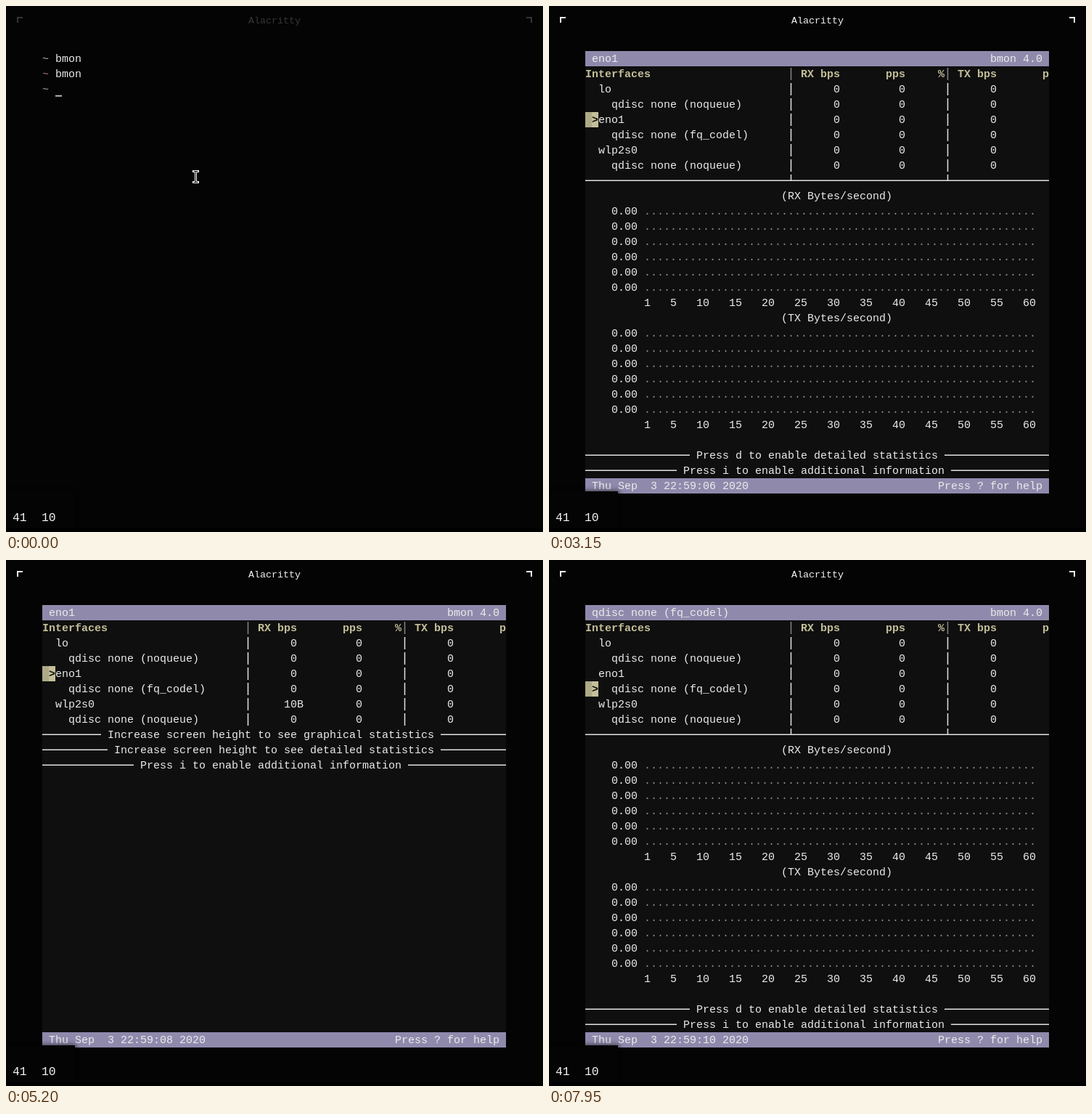
These frames come from a looping animation (740 by 724 pixels, 8000 ms). An HTML page:

```html
<!DOCTYPE html>
<html lang="en">
<head>
<meta charset="utf-8">
<title>Terminal</title>
<style>
html, body { margin: 0; width: 100%; height: 100%; overflow: hidden; background: #040404; }
svg { display: block; }
text { font: 15px "Liberation Mono", monospace; fill: #ebebeb; white-space: pre; }
.title { font-size: 13.33px; text-anchor: middle; }
.badge { font-size: 16.4px; fill: #f4f4f4; }
.head { font-weight: bold; fill: #c4bf99; }
.dim { fill: #8c8c8c; }
.mark { font-weight: bold; fill: #101010; }
</style>
</head>
<body>
<svg width="740" height="724" viewBox="0 0 740 724">
  <defs><filter id="soft" x="-20%" y="-30%" width="140%" height="160%"><feGaussianBlur stdDeviation="3"/></filter></defs>
  <rect width="740" height="724" fill="#040404"/>
  <g id="frame">
    <path d="M16 23V16H23M717 16H724V23" fill="none" stroke-width="2"/>
    <text class="title" x="370" y="24">Alacritty</text>
  </g>
  <g id="screen"></g>
  <rect x="-10" y="667" width="107" height="54" fill="#000" opacity=".6" filter="url(#soft)"/>
  <rect y="668" width="95" height="51" fill="#040404"/>
  <rect y="719" width="740" height="5" fill="#000"/>
  <text class="badge" x="9" y="709">41</text>
  <text class="badge" x="49" y="709">10</text>
</svg>
<script>
const LOOP = 8000, CW = 9, RH = 21, LEFT = 50, TOP = 62, COLS = 71;
const LILAC = '#8f8aac', LIGHT = '#e2e2e2', GREY = '#858585';
const screen = document.getElementById('screen');
const frame = document.getElementById('frame');

const items = ['lo', 'qdisc none (noqueue)', 'eno1', 'qdisc none (fq_codel)', 'wlp2s0', 'qdisc none (noqueue)'];

// Each entry changes part of the state from its time on.
const steps = [
  [0, { focus: false, mouse: true, typed: '', app: false, sel: 0, sec: 4, rate: '0', graph: true, bars: [] }],
  [500, { focus: true }],
  [1250, { mouse: false }],
  [1300, { typed: 'bmon' }],
  [1650, { app: true }],
  [2600, { sec: 5 }],
  [2800, { sel: 1 }],
  [3150, { sel: 2, sec: 6 }],
  [3400, { sel: 3 }],
  [3600, { rate: '41B' }],
  [3800, { sel: 2 }],
  [3950, { sel: 1 }],
  [4050, { sel: 2 }],
  [4200, { sel: 3, sec: 7 }],
  [4350, { sel: 4 }],
  [4400, { bars: [41] }],
  [4600, { rate: '10B', bars: [10, 41] }],
  [4700, { sel: 3 }],
  [4750, { bars: [] }],
  [4950, { sel: 2 }],
  [5200, { graph: false, sec: 8 }],
  [5600, { rate: ' 3B' }],
  [6000, { graph: true }],
  [6050, { rate: ' 1B' }],
  [6600, { rate: '0', sec: 9 }],
  [7300, { sel: 3, sec: 10 }],
  [7700, { sel: 2 }],
  [7950, { sel: 3 }]
];

const px = col => LEFT + col * CW;
const py = row => TOP + row * RH;
const esc = s => s.replace(/&/g, '&amp;').replace(/</g, '&lt;').replace(/>/g, '&gt;');
const rect = (x, y, w, h, fill) => `<rect x="${x}" y="${y}" width="${w}" height="${h}" fill="${fill}"/>`;
const text = (col, row, s, cls = '', fill = '') =>
  `<text x="${px(col)}" y="${py(row) + 15}" class="${cls}"${fill && ` style="fill:${fill}"`}>${esc(s)}</text>`;
const bar = (col, row, fill = LIGHT) => rect(px(col) + 3.75, py(row) + 2, 1.5, 17, fill);
const rule = (from, to, row) => rect(px(from), py(row) + 9.5, (to - from) * CW, 1.5, LIGHT);

function message(col, row, s) {
  const end = col + s.length;
  return rule(0, col - 1, row) + text(col, row, s) + rule(end + 1, COLS, row);
}

function shell(s) {
  let out = ['#b4b8a8', '#bd7280', '#a4ada6'].map((c, i) => text(0, i, '~', '', c)).join('');
  out += text(2, 0, 'bmon') + text(2, 1, 'bmon') + text(2, 2, s.typed);
  out += rect(px(2 + s.typed.length), 123, CW, 1.5, LIGHT);
  if (s.mouse) {
    const beam = 'M258.5 227.5H264.5M261.5 227.5V242.5M258.5 242.5H264.5';
    out += `<path d="${beam}" stroke="#fff" stroke-width="3" stroke-linecap="square"/>` +
      `<path d="${beam}" stroke="#000" stroke-width="1"/>`;
  }
  return out;
}

function table(s) {
  let out = text(0, 1, 'Interfaces', 'head') + bar(31, 1, GREY) + bar(55, 1, GREY);
  [[33, 'RX bps'], [46, 'pps'], [54, '%'], [57, 'TX bps'], [70, 'p']]
    .forEach(([col, label]) => out += text(col, 1, label, 'head'));
  items.forEach((name, i) => {
    const row = i + 2, rate = i === 4 ? s.rate : '0';
    out += text(i % 2 ? 4 : 2, row, name) + bar(31, row) + bar(55, row);
    out += text(rate.length > 1 ? 37 : 38, row, rate) + text(48, row, '0') + text(62, row, '0');
  });
  const row = s.sel + 2;
  return out + rect(LEFT, py(row), CW, RH, '#aea987') + rect(px(1), py(row), CW, RH, '#c4bf99') +
    text(1, row, '>', 'mark');
}

function chart(top, name, bars) {
  const peak = Math.max(0, ...bars);
  let out = text(30, top, `(${name} Bytes/second)`);
  if (peak) out += text(7, top, 'B');
  for (let i = 0; i < 6; i++) {
    const row = top + 1 + i, level = peak * (6 - i) / 6;
    let line = '';
    for (let c = 0; c < 60; c++) {
      const full = bars[c] >= level;
      const part = bars[c] > level - peak / 6;
      line += full ? ' ' : part ? ':' : '.';
      if (full) out += bar(9 + c, row, GREY);
    }
    out += text(3, row, level.toFixed(2).padStart(5)) + text(9, row, line, 'dim');
  }
  out += text(9, top + 7, '1') + text(13, top + 7, '5');
  for (let n = 10; n <= 60; n += 5) out += text(8 + n - 1, top + 7, '').slice(0, 0) + text(7 + n, top + 7, String(n));
  return out;
}

function monitor(s) {
  let out = rect(LEFT, TOP, 639, 609, '#0f0f0f') + rect(LEFT, TOP, 639, RH, LILAC) + rect(LEFT, py(28), 639, RH, LILAC);
  out += text(1, 0, items[s.sel]) + text(62, 0, 'bmon 4.0') + table(s);
  if (s.graph) {
    out += rule(0, COLS, 8);
    [31, 55].forEach(col => out += rect(px(col) + 3.75, py(8) + 2, 1.5, 8, LIGHT));
    out += chart(9, 'RX', s.bars) + chart(17, 'TX', []);
    out += message(17, 26, 'Press d to enable detailed statistics');
  } else {
    out += message(10, 8, 'Increase screen height to see graphical statistics');
    out += message(11, 9, 'Increase screen height to see detailed statistics');
  }
  out += message(15, s.graph ? 27 : 10, 'Press i to enable additional information');
  const clock = `22:59:${String(s.sec).padStart(2, '0')}`;
  return out + text(1, 28, `Thu Sep  3 ${clock} 2020`) + text(54, 28, 'Press ? for help');
}

let shown = -1;
function draw(t) {
  const past = steps.filter(([at]) => at <= t);
  if (past.length === shown) return;
  shown = past.length;
  const s = Object.assign({}, ...past.map(step => step[1]));
  const ink = s.focus ? '#f2f2f2' : '#363636';
  frame.firstElementChild.setAttribute('stroke', ink);
  frame.lastElementChild.style.fill = ink;
  screen.innerHTML = s.app ? monitor(s) : shell(s);
}

const start = performance.now();
function tick() {
  draw((performance.now() - start) % LOOP);
  requestAnimationFrame(tick);
}
tick();
</script>
</body>
</html>
```
